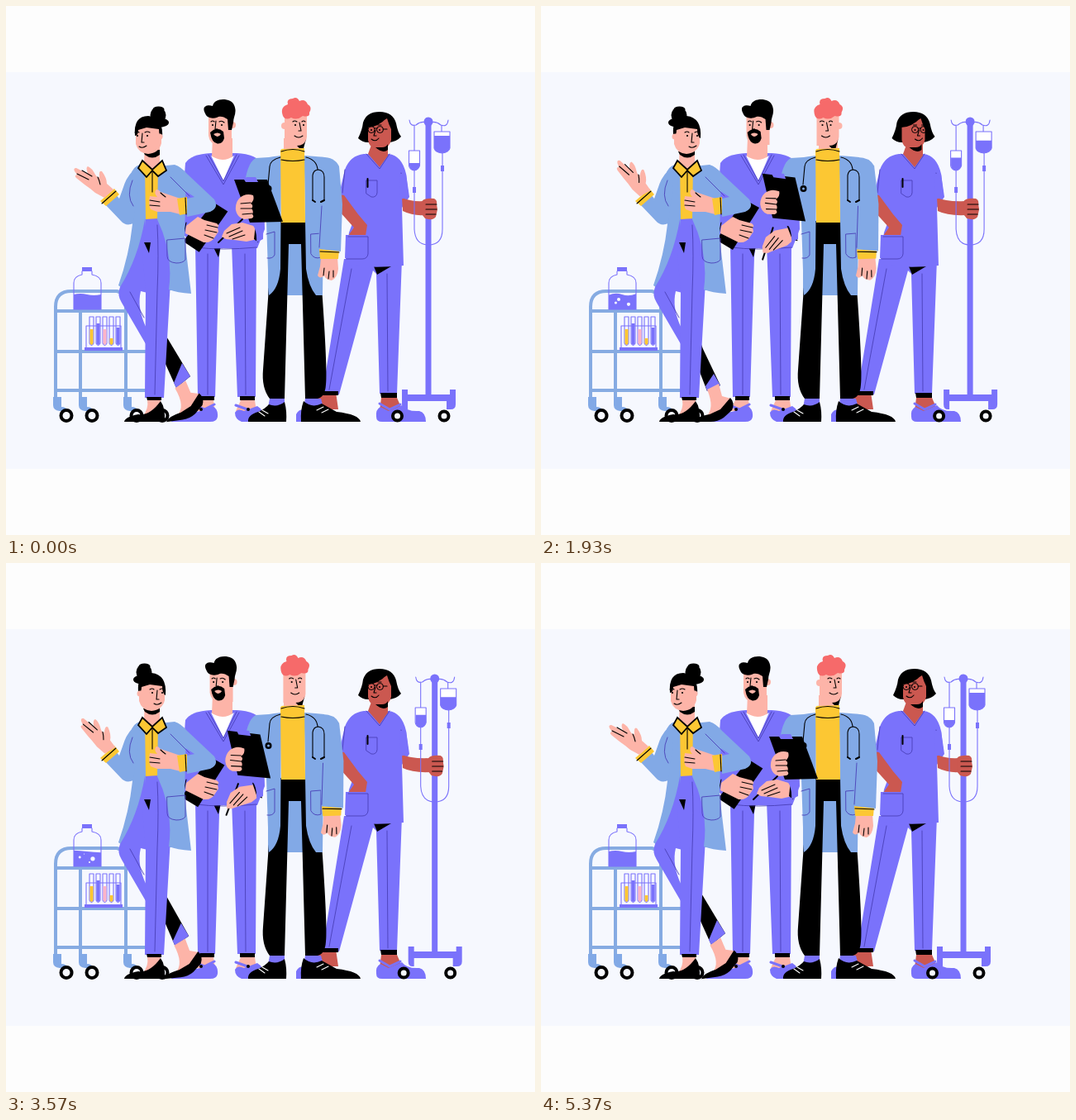
Animation of 640 by 640 pixels, one loop 5.41 s. Source, as an HTML page:

```html
<!DOCTYPE html>
<html lang="en">
<head>
<meta charset="utf-8">
<title>Medical team</title>
<style>
html, body { margin: 0; width: 100%; height: 100%; overflow: hidden; background: #fdfdfd }
svg { display: block; width: 100vw; height: 100vh }
.p { fill: #7a72fb } .g { fill: #82a9e6 } .y { fill: #fcc733 } .s { fill: #fdb4a8 }
.b { fill: #cb5850 } .r { fill: #f66a6a } .w { fill: #fff } .bg { fill: #f6f8fe }
.l, .d, .v, .c { fill: none; stroke: #000; stroke-width: 1.1; stroke-linecap: round; stroke-linejoin: round }
.d { stroke: #4a40b8; stroke-width: .9 }
.v { stroke: #7a72fb }
.c { stroke: #86abe2; stroke-width: 4; stroke-linecap: butt }
.thick { stroke-width: 2 }
.strap { stroke-width: 3 }
.bag { fill: #fff }
.wheel { fill: #f6f8fe; stroke: #000; stroke-width: 4 }
</style>
</head>
<body>
<svg viewBox="0 0 640 640">
<rect class="bg" y="80" width="640" height="480"/>

<g id="cart">
  <path class="c" d="M60 475V364Q60 345 79 345H134Q145 347 145 364V475M90 369V475M60 369H145M60 418H176M60 465H178"/>
  <g id="casters"></g>
  <path class="v" d="M92 321V325Q82 327 82 335V367H115V335Q115 327 104 325V321"/>
  <path class="p" d="M92 316h12v5H92z"/>
  <path class="p" id="liquid"/>
  <g id="bubbles" class="bg"></g>
  <g id="tubes"></g>
  <path class="v" d="M97 413V387H139V413"/>
  <path class="p" d="M95 413h46v4H95z"/>
</g>

<g id="man2">
  <path class="p" d="M229 288L232 473H253L258 303L260 288H273L280 473H302L303 288z"/>
  <path d="M250 290H260L257 304zM235 472h17v5h-17zM283 472h18v5h-18z"/>
  <path class="d" d="M244 300V470M289 300L290 470"/>
  <path class="s" d="M235 477H251L253 490H229zM284 477H301L303 490H278z"/>
  <path class="p" d="M200 503Q203 493 222 489Q229 494 239 488L250 484Q257 488 256 497Q255 503 247 503zM277 492Q280 486 288 490L304 484Q312 488 312 503H285Q277 500 277 492z"/>
  <path class="v strap" d="M228 483L240 488L252 482M278 483L292 488"/>
  <circle cx="236" cy="488" r="2"/><circle cx="293" cy="488" r="2"/>
  <path class="p" d="M217 190Q224 179 248 178H279Q303 179 311 192L313 270L304 293H229L211 272z"/>
  <path class="s" d="M250 160H274V182L263 198L249 182z"/>
  <path class="w" d="M248 181Q262 191 276 181L263 211z"/>
  <path class="d" d="M245 180L263 212L279 180M242 181L263 216L282 181M230 292Q260 296 303 292"/>
  <g id="head2">
    <path class="s" d="M245 130V157Q247 168 257 168H273V131z"/>
    <circle class="s" cx="274" cy="144" r="4"/>
    <path d="M241 130C236 121 244 119 250 121C252 110 273 111 276 120C280 129 275 134 275 141L273 150H269L268 137C264 134 260 133 257 134C251 137 243 136 241 130z"/>
    <g id="face2">
      <path d="M247 153Q255 145 263 152L264 160Q262 167 256 166.500Q249 166 247 153z"/>
      <path class="s" d="M251 155Q256 152 260 155Q256 161 251 155z"/>
      <path class="l" d="M248 140Q250 138 252 140M258 140Q261 138 264 141M254 139L253 149H256"/>
      <circle cx="250" cy="144" r="1.100"/><circle cx="261" cy="144" r="1.100"/>
    </g>
  </g>
  <g id="board2"><path d="M246 234L264 244L232 295L212 283z"/></g>
  <path class="s" d="M218 266L232 255L240 259L255 263Q259 266 256 268L257 273L253 279Q249 287 239 286L217 275z"/>
  <path class="l" d="M243 265L256 268M241 271L255 274M240 277L251 281M218 262L215 276"/>
  <g id="pen">
    <path class="l thick" d="M257 286L286 258"/>
    <path class="s" d="M306 268L286 262L273 264L264 272L261 279L266 282L276 283L291 285L304 282z"/>
    <path class="l" d="M283 268L267 275M286 272L270 279M289 277L274 282"/>
    <path d="M302 264L308 268L305 286L300 282z"/>
  </g>
  <path class="p" d="M300 230L312 230L311 282L303 286Q304 272 298 264z"/>
</g>

<g id="woman4">
  <path class="p" d="M409 306L383 467L403 470L444 320L448 324L452 469H473L479 306z"/>
  <path class="b" d="M381 467H399L402 488H370zM454 474H473L480 490H452z"/>
  <path d="M384 466H402V471H383zM453 468H473V474H454zM445 315H466L449 325z"/>
  <path class="d" d="M418 318L391 464M461 324L462 466"/>
  <path class="p" d="M351 503V494Q354 487 362 488L385 484V503zM448 497Q447 488 453 485L463 490L479 483Q485 491 500 490Q508 492 508 503H455Q448 503 448 497z"/>
  <path class="v strap" d="M452 481L464 488L477 482"/>
  <path class="p" d="M433 179Q416 181 410 198L402 232L424 250L415 274L410 313Q444 318 481 314L479 244L488 231L484 203Q479 181 463 179z"/>
  <path class="b" d="M402 228L409 229L426 252L437 265L435 278H414L421 268L402 247z"/>
  <path class="p" d="M411 277H437Q440 288 437 305H410z"/>
  <path class="d" d="M414 279H438V300Q437 306 431 306H412M436 211H449V226Q448 232 442 231L436 227zM478 202L481 229M410 198L407 226"/>
  <path class="l thick" d="M437.500 209V219"/>
  <path class="b" d="M445 160H462V181L452 195L438 179z"/>
  <path class="d" d="M436 179L452 197L464 179"/>
  <g id="hair4">
    <path d="M426 160Q431 150 432 141Q436 128 452 128Q468 128 472 142Q474 153 478 158Q472 165 462 165H438Q431 165 426 160z"/>
    <path class="b" d="M438 145Q449 143 461 136Q463 143 466 149V162Q464 172 455 172H446Q439 170 438 162z"/>
    <path d="M447 171H455Q460 171 462 167V174Q456 179 447 171zM437 147Q450 147 462 134L452 132L437 137z"/>
    <g id="face4">
      <g fill="none" stroke="#000"><circle cx="442" cy="149.500" r="4"/><circle cx="452.500" cy="149.500" r="4"/></g>
      <path class="l" d="M446 148h3M456 149h5M440 144h4M450 144h4M447 150L445 157H448M442 161Q447 165 451 160"/>
      <circle cx="442" cy="150" r="1"/><circle cx="452" cy="150" r="1"/>
    </g>
  </g>
</g>

<path class="b" id="forearm"/>
<path class="p" d="M475 203L484 203L487 229Q482 234 477 233z"/>
<g id="stand">
  <path class="v" d="M488 138Q489 146 496 144Q503 138 511 142Q519 138 526 144Q534 147 535 138M494 144V175M527 144V152M494 199V270Q495 289 511 289Q528 289 528 270V178"/>
  <path class="v bag" d="M487.500 175h13v18q-1 5-6.500 6q-6-1-6.500-6zM518 152h19v20q-1 5-9.500 6q-8-1-9.500-6z"/>
  <path class="p" id="bags"/>
  <path class="p" d="M492 219h4v7h-4zM526 193h4v7h-4zM507.500 140h7V471h-7zM479 464h7v6h51v-6h7v18q0 6-6 6h-5v-10H486v10h-2q-5 0-5-6z"/>
  <circle class="p" cx="511" cy="140" r="5.500"/>
  <circle class="wheel" cx="473.500" cy="496" r="5.500"/>
  <circle class="wheel" cx="530" cy="496" r="5.500"/>
  <path class="b" d="M503 237Q505 232 518 233Q522 235 521 240L522 246L520 255Q517 260 507 257L503 252z"/>
  <path class="l" d="M508 240H521M508 246H521M508 252H520"/>
</g>

<g id="woman1">
  <path class="g" d="M168 290H205L203 344H167z"/>
  <path id="calf"/>
  <path class="p" id="cuff"/>
  <g id="foot">
    <path class="s" d="M201 464L215 457L219 472L230 475L222 494L199 497Q211 488 201 464z"/>
    <path d="M185 503Q187 497 204 494L217 488L229 474Q235 480 231 489L221 498Q214 503 205 503z"/>
  </g>
  <path class="g" d="M162 192Q154 194 151 204L153 264Q149 301 136 338Q146 347 162 348L172 300V195z"/>
  <path class="p" d="M168 258L169 290L178 300L172 345L172 414L140 359Q134 350 138 340Q160 305 168 258z"/>
  <path class="bg" d="M163 345L171 347L170 390Q158 365 163 345z"/>
  <path class="p" d="M169 256H185Q200 290 200 315L191 474H168L169 345L165 300z"/>
  <path class="d" d="M183 265Q185 300 183 345L180 470M150 346L167 377"/>
  <path d="M167 286H175L173 299zM170 473H188V477H171z"/>
  <path class="s" d="M171 477H187V491L165 497Q173 487 171 477z"/>
  <path d="M143 503Q144 497 160 494Q174 496 187 478Q193 486 192 503z"/>
  <path class="y" d="M168 194H185V257L169 258z"/>
  <path class="g" d="M184 194L204 192Q213 195 218 203L216 280L224 348Q207 347 197 343Q203 300 183 258z"/>
  <path class="d" d="M195 283L217 281V307Q214 311 206 311Q195 310 195 303z"/>
  <path class="s" d="M168 165H186V190L177 198L167 190z"/>
  <path d="M166 176Q178 174 186 174V180Q177 187 168 180z"/>
  <path class="y" stroke="#000" stroke-width="1.800" d="M165 187L177 198L189 187L194 199L184 206L177 199L170 207L160 196z"/>
  <path class="l" d="M177 199V225"/>
  <path class="g" d="M153 200Q145 208 141 222L137 233L133 228L119 239L139 260Q145 267 154 263L160 215z"/>
  <path class="d" d="M153 211Q145 230 154 242"/>
  <path class="y" d="M114 236L131 221L137 228L121 242z"/>
  <path class="l" d="M116 239L133 224"/>
  <g id="wave">
    <path class="s" d="M119 232L108 226Q101 220 95 216L85 208Q82 205 86 204L83 200Q81 196 85 196L91 199L99 203Q96 195 99 194Q104 196 108 204Q110 208 113 207Q112 198 116 200Q122 208 122 215L130 222z"/>
    <path class="l" d="M86 203L100 210M92 199L104 206M111 207Q113 211 114 216"/>
  </g>
  <path class="s" d="M211 233L187 225Q183 220 181 223Q179 227 183 231L174 230Q172 240 175 246L183 249L199 249L211 252z"/>
  <path class="l" d="M186 237L174 235M186 242L174 241M187 226Q190 229 193 231"/>
  <path class="y" d="M207 233L219 231L220 251L210 253z"/>
  <path class="l" d="M217 232L218 252"/>
  <path class="g" d="M200 193Q212 194 219 203L252 234Q258 244 247 249L219 255V233L228 231L206 217z"/>
  <path class="d" d="M199 207L222 230"/>
  <g id="head1">
    <g id="bun">
      <circle cx="175.500" cy="132" r="9.500"/><ellipse cx="175.500" cy="141" rx="13" ry="6"/>
      <ellipse cx="176" cy="125" rx="7" ry="3.500"/>
    </g>
    <path class="s" d="M159 147V167Q162 178 174 179Q187 178 190 166V147z"/>
    <path d="M158 157Q156 133 174 133Q193 135 191 160Q187 158 187 149L172 147L162 150Q162 157 158 157z"/>
    <circle class="s" id="ear1" cy="158" r="3.500"/>
    <g id="face1">
      <path class="l" d="M165 153Q168 151 170 153M177 153Q180 151 183 153M174 154L173 165H176M170 170Q174 173 179 169"/>
      <circle cx="168" cy="157" r="1.100"/><circle cx="180" cy="157" r="1.100"/>
    </g>
  </g>
</g>

<g id="man3">
  <path class="g" d="M317 260H380V350H317z"/>
  <path d="M332 260H363L382 340Q389 440 387 458Q386 473 377 475H362L357 288H342L337 475H319Q309 462 311 440L318 340z"/>
  <path class="p" d="M319 475H337V486H317zM362 475H381L384 486H360z"/>
  <path d="M293 503Q292 495 305 491Q314 487 318 482Q328 486 337 479Q340 490 339 503zM357 503Q356 489 360 478Q370 487 382 481L400 491Q427 494 429 503z"/>
  <path class="l" style="stroke:#fff" d="M310 489L317 493M306 491L313 496M384 485L376 489M390 488L382 492"/>
  <path class="g" d="M318 183Q342 178 385 183L383 350H375Q366 339 363 318L361 200H333L332 318Q330 342 318 350L315 260L288 222Q291 190 302 184z"/>
  <path class="d" d="M315 276L325 273V301Q323 306 316 305M369 276L381 275V304Q373 307 369 300z"/>
  <path class="s" d="M336 160H359V178H336z"/>
  <path class="y" d="M332 176Q332 172 337 173L361 172L362 262H333z"/>
  <path class="l" d="M333 186Q347 189 361 186M333 176Q347 171 361 176"/>
  <g id="arm3">
    <path class="s" d="M381 304H401L402 318Q401 329 394 332Q386 331 385 326Q380 331 377 326L380 315z"/>
    <path class="l" d="M384 326L385 317M390 330L391 321M396 328V320"/>
    <path class="y" d="M379 294L403 295L402 306H380z"/>
    <path class="l" d="M380 297L403 298"/>
    <path class="g" d="M377 183Q397 181 403 194L407 240L405 297L379 294z"/>
    <path class="d" d="M382 242L379 292"/>
  </g>
  <path class="l" d="M332 183Q320 186 319 194L317 216M363 183Q376 186 377 198M371 235V205Q372 198 378 198Q385 199 385 207V235"/>
  <circle cx="317.500" cy="221" r="4"/><circle class="g" cx="317.500" cy="221" r="1.500"/>
  <path class="l thick" d="M371 235L374 237M385 235L381 237"/>
  <g id="head3">
    <path class="s" d="M337 127H364V158Q363 169 352 169H337z"/>
    <path d="M352 169Q361 169 363 161L360 172H355z"/>
    <circle class="s" id="ear3" cy="145" r="4"/>
    <path class="r" d="M335 133Q331 122 341 119Q339 112 347 112Q352 109 355 115Q362 112 365 119Q371 122 367 129Q368 135 359 133Q352 139 345 135Q338 139 335 133z"/>
    <g id="face3">
      <path class="l" d="M347 140Q349 138 352 140M358 140Q360 138 362 140M355 141L357 151H354M349 157Q354 161 359 157"/>
      <circle cx="350" cy="144" r="1.100"/><circle cx="360" cy="144" r="1.100"/>
    </g>
  </g>
  <g id="board3">
    <path d="M276 210H316L335 261L295 262z"/>
    <path class="p" d="M288 210L291 207H302L305 213H290z"/>
    <path class="s" d="M299 229Q289 226 282 233Q277 239 278 247Q280 256 288 258L297 257Q301 255 298 252Q300 248 297 245Q300 241 296 239Q301 235 299 229z"/>
    <path class="l" d="M296 238L284 239M297 245L284 245M298 251L286 252"/>
  </g>
</g>
</svg>
<script>
const LOOP = 5410, TAU = Math.PI * 2;
const $ = id => document.getElementById(id);
const move = (id, x, y = 0, turn = '') => $(id).setAttribute('transform', `translate(${x} ${y}) ${turn}`);
const path = (id, d) => $(id).setAttribute('d', d);

// Eased value at time t through [time, value] stops, held outside them
function key(t, ...stops) {
  let [a, v] = stops[0];
  if (t <= a) return v;
  for (const [b, w] of stops.slice(1)) {
    if (t < b) return v + (w - v) * (1 - Math.cos(Math.PI * (t - a) / (b - a))) / 2;
    [a, v] = [b, w];
  }
  return v;
}

$('casters').innerHTML = [73, 104, 158, 189].map(x =>
  `<path class="g" d="M${x - 16} 473h10v12q6 0 8 5h-10q-8-1-8-7z"/><circle class="wheel" cx="${x}" cy="495.500" r="6.500"/>`
).join('');
$('tubes').innerHTML = ['#fcc733', '#7a72fb', '#fdb4c8', '#fcc733', '#7a72fb'].map((c, i) => {
  const x = 101 + i * 8, top = [391, 384, 391, 402, 389][i];
  return `<path class="v" d="M${x} 376V408q2.500 5 5 0V376z"/><path fill="${c}" d="M${x + .5} ${top}h4V408q-2 4-4 0z"/>`;
}).join('');
$('bubbles').innerHTML = '<circle/>'.repeat(4);

function draw(t) {
  const sway = Math.cos(TAU * t / LOOP);
  const pole = 5 - 5 * sway;
  move('stand', pole);
  path('forearm', `M479 232Q490 237 ${506 + pole} 236V253Q492 254 480 248z`);
  const left = 186 + 4 * sway, right = 160.5 - 3.5 * sway;
  path('bags', `M488 ${left}h12.500V193q-1 5-6.500 6q-6-1-6-6zM518 ${right}h19V172q-1 5-9.500 6q-8-1-9.500-6z`);

  const lift = (1 - Math.cos(4 * TAU * t / LOOP)) / 2;
  move('wave', lift, -lift, `rotate(${lift * 15} 122 230)`);

  const turn1 = key(t, [800, -1], [1660, 1], [3600, 1], [4460, -1]);
  move('head1', 2 * turn1);
  move('face1', 7 * turn1);
  move('bun', -10.5 * turn1);
  $('ear1').setAttribute('cx', 174 - 14 * turn1);

  const f = key(t, [500, 0], [1500, 1], [3000, 1], [3900, 0]);
  move('foot', 9 * (1 - f), 0, `rotate(${-8 * (1 - f)} 187 503)`);
  path('calf', `M160 360L185 385L196 ${403 + 12 * f}L${223 - 6 * f} ${448 + 11 * f}L${206 - 5 * f} ${462 + 4 * f}z`);
  path('cuff', `M${213 - 4 * f} ${432 + 13 * f}L${223 - 6 * f} ${448 + 11 * f}L${206 - 5 * f} ${462 + 4 * f}L${203 - 4 * f} ${456 + 4 * f}z`);

  const x2 = key(t, [0, 3], [900, 0], [1250, 0], [2300, 9], [3100, 9], [4050, 0], [4700, 0], [LOOP, 3]);
  move('head2', x2 - 3);
  move('face2', (3 - x2) / 4);
  const pen = key(t, [900, 0], [1800, 1], [3300, 1], [4600, 0]);
  move('pen', 0, 0, `rotate(${-28 * pen} 304 274)`);
  move('board2', 3 * (1 - pen), 3 * (1 - pen), `rotate(${3 * (1 - pen)} 235 270)`);

  const b = key(t, [1200, 0], [2100, 1], [3300, 1], [4700, 0]);
  move('board3', -9 * b, -8 * b, `rotate(${7.7 * b} 276 210)`);
  move('arm3', 0, 0, `rotate(${-1.8 * b} 390 190)`);
  const h3 = key(t, [1250, 0], [1900, 1], [3200, 1], [3900, 0]);
  move('head3', -3.5 * h3);
  move('face3', -6 * h3);
  $('ear3').setAttribute('cx', 337 + 27 * h3);

  const h4 = key(t, [400, 0], [1100, 1], [2500, 1], [3400, 0]);
  move('hair4', -1.5 * h4);
  move('face4', 12 * h4);

  const stir = key(t, [500, 0], [1400, 1], [3900, 1], [5000, 0]);
  const tip = 1.5 * stir * Math.sin(4 * TAU * t / LOOP);
  path('liquid', `M82 ${349 + tip}Q90 ${347 - tip} 98 349T115 ${349 - tip}V367H82z`);
  [...$('bubbles').children].forEach((c, i) => {
    const u = (4 * t / LOOP + i * .29) % 1;
    c.setAttribute('cx', 90 + i * 5 + Math.sin(TAU * u));
    c.setAttribute('cy', 365 - 14 * u);
    c.setAttribute('r', stir * (1.6 + i % 2) * Math.sin(Math.PI * u));
  });
}

const start = performance.now();
function tick() {
  draw((performance.now() - start) % LOOP);
  requestAnimationFrame(tick);
}
tick();
</script>
</body>
</html>
```
